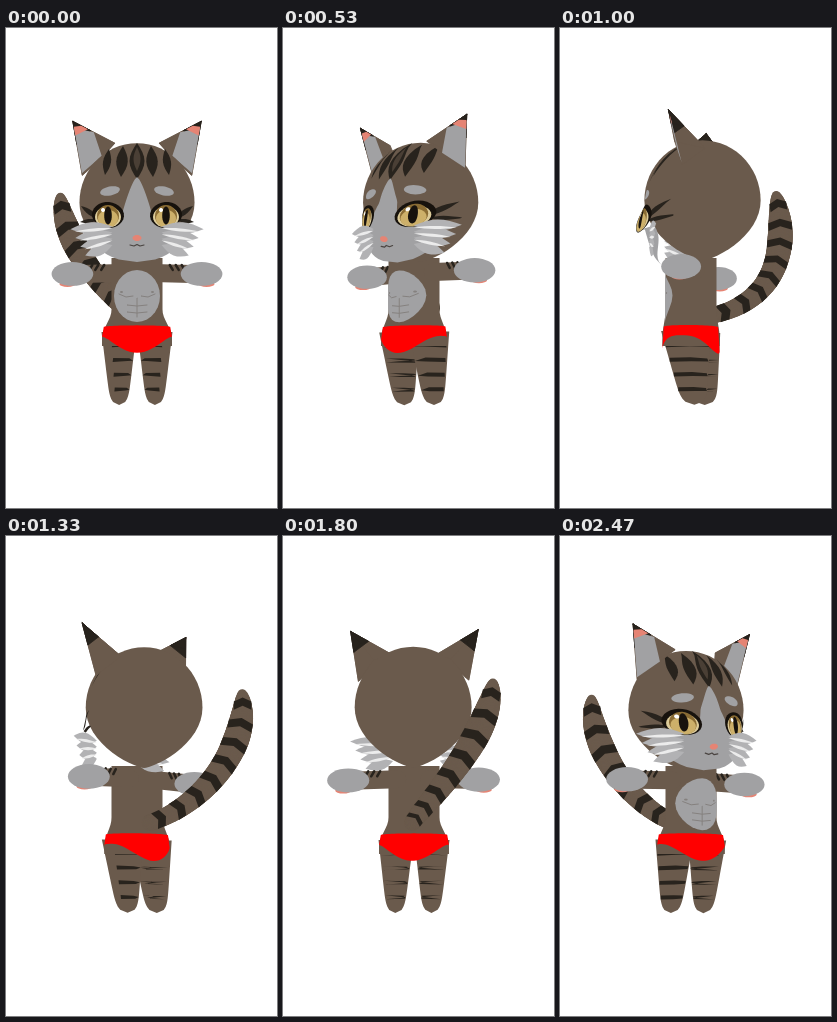
An HTML page with a canvas for the animation above (2.54 s loop, 271 by 480 pixels).

```html
<!DOCTYPE html>
<html>
<head>
<meta charset="utf-8">
<title>Turning cat</title>
<style>
html, body { margin: 0; width: 100%; height: 100%; overflow: hidden; background: #fff; }
canvas { display: block; width: 100vw; height: 100vh; }
</style>
</head>
<body>
<canvas id="stage" width="271" height="480"></canvas>
<script>
const g = document.getElementById('stage').getContext('2d');
const LOOP = 2540, STEP = 66.7, LAST = 37;
const AXIS = 131, HORIZON = 390, PERSPECTIVE = .00066;
const FUR = '#6a5a4c', DARK = '#28231d', GREY = '#a1a1a3', LINE = '#85817f', PINK = '#e58474', RED = '#ff0000';
const TURN = [[0, 0], [8, 34], [15, 107], [20, 144], [27, 184], [32, 264], [LAST, 335]];

const { sin, cos, abs, sqrt, hypot, max, min, PI } = Math;
let S = 0, C = 1;

// Smooth curve through the turning points, in radians
function angleAt(step) {
  const at = i => TURN[max(0, min(TURN.length - 1, i))];
  const n = max(1, TURN.findIndex(k => k[0] >= step)), a = at(n - 1), b = at(n);
  const slope = i => (at(i + 1)[1] - at(i - 1)[1]) / (at(i + 1)[0] - at(i - 1)[0]);
  const w = b[0] - a[0], u = (step - a[0]) / w, v = 1 - u;
  return (a[1] * v * v * (1 + 2 * u) + b[1] * u * u * (1 + 2 * v)
    + w * u * v * (slope(n - 1) * v - slope(n) * u)) * PI / 180;
}

const depth = (x, z) => z * C + x * S;
function view(X, y, d) {
  const q = 1 / (1 - d * PERSPECTIVE);
  return [AXIS + X * q, HORIZON + (y - HORIZON) * q, q];
}
const project = (x, y, z) => view(x * C - z * S, y, depth(x, z));
const mix = (a, b, u) => a.map((v, i) => v + (b[i] - v) * u);
const range = (n, f) => Array.from({ length: n + 1 }, (_, i) => f(i / n));
const smooth = u => (u = max(0, min(1, u)), u * u * (3 - 2 * u));
const sides = f => { f(-1); f(1); };

function trace(pts) {
  g.beginPath();
  pts.forEach(p => g.lineTo(p[0], p[1]));
}
function fill(pts, color) { trace(pts); g.closePath(); g.fillStyle = color; g.fill(); }
function line(pts, color, width) {
  trace(pts);
  g.lineCap = g.lineJoin = 'round'; g.strokeStyle = color; g.lineWidth = width; g.stroke();
}
function oval(x, y, rx, ry, color) {
  g.beginPath(); g.ellipse(x, y, rx, ry, 0, 0, 7); g.fillStyle = color; g.fill();
}
const ring = (x, y, rx, ry, tilt = 0) => range(28, u => {
  const a = rx * cos(u * 2 * PI), b = ry * sin(u * 2 * PI);
  return [x + a * cos(tilt) - b * sin(tilt), y + a * sin(tilt) + b * cos(tilt)];
});
// Pointed lens between two ends
function leaf(x0, y0, x1, y1, width) {
  const len = hypot(x1 - x0, y1 - y0), nx = (y0 - y1) / len, ny = (x1 - x0) / len;
  const edge = s => range(8, u => {
    const w = s * width / 2 * sin(u * PI);
    return [x0 + (x1 - x0) * u + nx * w, y0 + (y1 - y0) * u + ny * w];
  });
  return [...edge(1), ...edge(-1).reverse()];
}

// Wraps marks given in front view around a rounded surface; bulge(x, y) is its front depth
function skin(bulge, back) {
  return (pts, color, width) => {
    const spots = pts.map(([fx, fy]) => {
      const z = bulge(fx, fy), q = 1 / (1 - PERSPECTIVE * (z + back)), x = fx / q;
      return { X: x * C - z * S, y: HORIZON + (fy - HORIZON) / q, d: depth(x, z) };
    });
    const seen = spots.filter(p => p.d >= 0);
    if (!seen.length || width && seen.length < spots.length) return;
    const side = Math.sign(seen.reduce((sum, p) => sum + p.X, 0));
    const out = spots.map(({ X, y, d }) =>
      view((d < 0 ? side * hypot(X, d) : X) - back * S, y, max(d, 0) + back * C));
    width ? line(out, color, width) : fill(out, color);
  };
}
const onHead = skin((x, y) => {
  const u = x / 58, v = y - 173, snout = v > 0 ? 13 * sin(v / 62 * PI) * (1 - u * u) : 0;
  return 58 * sqrt(max(.04, 1 - u * u - (v / (v > 0 ? 85 : 60)) ** 2)) + snout;
}, -12);
const onBelly = skin(x => sqrt(max(0, 26 * 26 - x * x)), 0);

// Solid with elliptical slices; shape(y) gives half width, half depth and z
function lathe(top, bottom, x0, shape, color) {
  const edge = s => range(24, u => {
    const y = top + (bottom - top) * u, [a, b, z] = shape(y);
    return view(x0 * C - z * S + s * hypot(a * C, b * S), y, depth(x0, z));
  });
  fill([...edge(-1), ...edge(1).reverse()], color);
}

function tail() {
  const ctrl = [[0, 288, -22], [-18, 273, -85], [-76, 216, -81], [-80, 159, -68]];
  const at = u => {
    let p = ctrl;
    while (p.length > 1) p = p.slice(1).map((b, i) => mix(p[i], b, u));
    return project(...p[0]);
  };
  const radius = u => u < .7 ? 8 + 7 * u : 12.9 * sqrt(max(0, 1 - ((u - .7) / .32) ** 2));
  range(120, u => {
    const [x, y, q] = at(u);
    oval(x, y, radius(u) * q, radius(u) * q, FUR);
  });
  for (let u = .04; u < 1; u += .125) {
    const a = at(u), b = at(u + .05), r = radius(u + .02) * a[2], len = hypot(b[0] - a[0], b[1] - a[1]);
    const tx = (b[0] - a[0]) / len, ty = (b[1] - a[1]) / len;
    const rib = (p, v) => {
      const fwd = v ? -2 : 2;
      return [p[0] - ty * v + tx * fwd, p[1] + tx * v + ty * fwd];
    };
    fill([rib(a, -r), rib(a, 0), rib(a, r), rib(b, r), rib(b, 0), rib(b, -r)], DARK);
  }
}

function arm(s) {
  const z = -10, at = (x, y) => project(s * x, y, z);
  line([at(16, 244), at(55, 245)], FUR, 18);
  for (let x = 33; x < 48; x += 6) line([at(x, 236), at(x + 3, 241)], DARK, 2.5);
  const [x, y, q] = at(65, 245), pad = at(70, 255);
  oval(pad[0], pad[1], 8, 3, PINK);
  oval(x, y, 21 * q * hypot(C, .9 * S), 12 * q, GREY);
}

function legShape(y) {
  const v = (y - 304) / 73, a = 17.5 * (1 - .5 * v) * sqrt(max(0, 1 - v ** 14));
  return [a, 1.42 * a, -9 * v];
}
function leg(s) {
  lathe(304, 377, s * 18, legShape, FUR);
  for (let y = 318; y < 365; y += 14.5) {
    const [a, b, z] = legShape(y);
    const mark = leaf(.45, y + 2, 1.85, y - 2, 7)
      .filter(([f]) => depth(s * sin(f) / a, cos(f) / b) > 0)
      .map(([f, h]) => project(s * (18 + a * sin(f)), h, z + b * cos(f)));
    if (mark.length > 2) fill(mark, DARK);
  }
}

function pants() {
  const a = 35, b = 28, end = Math.atan2(a * C, -b * S);
  const rim = (size, height) => range(30, u => {
    const f = end - u * PI;
    return project(size * a * sin(f), height(f), size * b * cos(f));
  });
  fill([...rim(.95, () => 299), ...rim(1, f => 309 + 17 * abs(cos(f)) ** 3).reverse()], RED);
}

function torso() {
  [-1, 1].sort((p, q) => (p - q) * S).forEach(leg);
  lathe(230, 318, 0, y => {
    const hip = smooth((y - 282) / 28);
    return [25.5 + 9.5 * hip, 25.5 + 2.5 * hip, 0];
  }, FUR);
  onBelly(ring(0, 268, 23, 26), GREY);
  sides(s => {
    onBelly([[s * 4, 268], [s * 11, 269], [s * 18, 266]], LINE, 1);
    onBelly(ring(s * 15.5, 264, 1.5, 1), LINE);
  });
  onBelly([[0, 270], [0, 289]], LINE, 1);
  for (const y of [277, 284]) onBelly([[-10, y], [0, y + 1], [10, y]], LINE, 1);
  pants();
}

function ear(s) {
  const tip = [s * 64, 94, 3], outer = [s * 55, 146, -8], inner = [s * 22, 117, 10], back = [s * 38, 128, -26];
  const cone = (u, color) => {
    const [o, i, b] = [outer, inner, back].map(p => project(...mix(tip, p, u)));
    const t = project(...tip);
    for (const face of [[t, o, i], [t, o, b], [t, i, b]]) { fill(face, color); line([...face, t], color, .8); }
  };
  cone(1, FUR);
  cone(.42, DARK);
  if (depth(s * .55, .85) < -.05) return;
  const spot = (side, u) => project(...mix(tip, side, u));
  fill([spot(outer, .12), spot(outer, .96), project(...mix(outer, inner, .6)), spot(inner, .5)], GREY);
  fill([spot(outer, .1), spot(inner, .2), spot(inner, .36), spot(outer, .26)], PINK);
}

function tufts(s) {
  const spike = (i, inset, width, color) => fill(leaf(24, 203 + 6 * i, 66 - 5 * i - inset, 203 + 9 * i, width)
    .map(([x, y]) => project(s * x, y, 48 - .5 * x)), color);
  for (let i = 0; i < 4; i++) spike(i, 0, 11, '#b2b2b4');
  for (let i = 0; i < 3; i++) spike(i + .3, 3, 3, '#ececec');
}

function face() {
  for (let i = -2; i <= 2; i++) {
    const n = abs(i);
    onHead(leaf(i * 14, 115 + n * 3, i * 16, 151 - n * 2, 15 - 3.5 * n), DARK);
  }
  onHead(leaf(0, 119, 0, 143, 7), '#4a3f35');
  const jaw = s => range(34, u => {
    const y = 149 + 85 * u;
    return [s * (y < 197 ? 18 * ((y - 149) / 48) ** .7 : 46 * sqrt(max(0, 1 - ((y - 203) / 31) ** 2))), y];
  });
  onHead([...jaw(1), ...jaw(-1).reverse()], GREY);
  sides(s => {
    const x = s * 29;
    onHead(ring(s * 27, 163, 10, 4.5, s * .2), GREY);
    onHead(leaf(s * 38, 191, s * 56, 178, 5), DARK);
    onHead(leaf(s * 40, 192, s * 57, 194, 4), DARK);
    onHead(ring(x, 187, 16, 13, s * -.08), '#17120d');
    onHead(ring(x, 189, 13, 10.5), '#dccb9a');
    onHead(ring(x, 188, 11, 11), '#8a6c34');
    onHead(ring(x, 190.5, 10, 8.5), '#cdb06a');
    onHead(ring(x, 187.5, 3.8, 9), '#17120d');
    onHead(ring(x - 5, 182, 2, 2), '#fff');
  });
  onHead(ring(0, 210, 4.5, 3), PINK);
  onHead([[-7, 217], [-3, 218], [0, 216.5], [3, 218], [7, 217]], '#4a4441', 1.2);
}

function head() {
  const near = s => depth(s * 50, 0) > 14;
  const front = s => depth(s * 40, 30) > 0;
  sides(s => { if (!near(s)) ear(s); if (!front(s)) tufts(s); });
  const [x, y, q] = project(0, 173, -12);
  fill(range(60, u => {
    const c = cos(u * 2 * PI), v = sin(u * 2 * PI), taper = v > 0 ? sqrt(abs(c)) : 1;
    return [x + 58 * q * c * taper, y + 60 * q * v];
  }), FUR);
  face();
  sides(s => { if (front(s)) tufts(s); if (near(s)) ear(s); });
}

const start = performance.now();
function draw() {
  const now = (performance.now() - start) % LOOP;
  const angle = angleAt(min(LAST, Math.floor((now + 5) / STEP)));
  S = sin(angle);
  C = cos(angle);
  g.clearRect(0, 0, 271, 480);
  [
    [depth(-45, -70), tail],
    [depth(-50, -10), () => arm(-1)],
    [depth(50, -10), () => arm(1)],
    [0, torso],
    [.1, head]
  ].sort((a, b) => a[0] - b[0]).forEach(([, paint]) => paint());
  requestAnimationFrame(draw);
}
draw();
</script>
</body>
</html>
```
